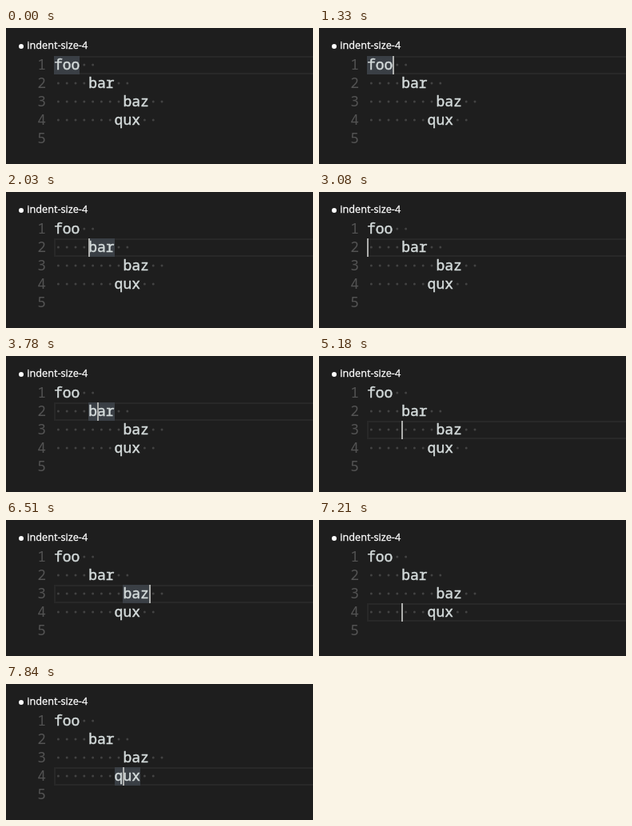
An HTML page that plays this animation: 384 px wide and 170 px high, repeating every 8000 ms.

```html
<!DOCTYPE html>
<html lang="en">
<head>
<meta charset="utf-8">
<title>Editor cursor</title>
<style>
  html, body { margin: 0; width: 100%; height: 100%; overflow: hidden; background: #1e1e1e; }
  svg { display: block; width: 100vw; height: 100vh; }
  .code { font: 18px "Noto Sans Mono", "DejaVu Sans Mono", monospace; fill: #d4dbdb; stroke: #d4dbdb; stroke-width: 0.45px; }
  .num { fill: #535353; stroke: none; text-anchor: end; }
  .tab { font: 12.7px "Open Sans", "Noto Sans", sans-serif; fill: #fff; stroke: #fff; stroke-width: 0.3px; }
  .space { fill: #434343; }
</style>
</head>
<body>
<svg viewBox="0 0 384 170">
  <circle cx="19" cy="23" r="3" fill="#fff"/>
  <text class="tab" x="26.3" y="26">indent-size-4</text>
  <rect id="line" x="61" width="330" height="21" fill="none" stroke="#282828" stroke-width="2"/>
  <rect id="mark" height="23" fill="#3a3f45"/>
  <g id="text"></g>
  <rect id="caret" width="2" height="23" fill="#aeafad"/>
</svg>
<script>
const LOOP = 8000, LEFT = 60, TOP = 35, CELL = 10.8, ROW = 23;
const TAB = 4, TICK = 70, REPEAT = 154, BLINK = 490;

const lines = ['foo', 'bar', 'baz', 'qux', ''].map((word, row) => {
  const indent = [0, 4, 8, 7, 0][row];
  return { word, indent, end: indent + word.length };
});

// start time and the arrow keys pressed from there at the repeat rate
const bursts = [
  [980, '>>>>>>'], [2030, '>'], [2520, '<'], [2870, '><'], [3290, '>'],
  [3640, '>>>>>>'], [4480, '>'], [4620, '>'], [5180, '<'],
  [5530, '<>>'], [6160, '>>>>>>'], [7210, '>>>>>']
];

// Whole tabs of indentation are crossed in one press.
function press({ row, col }, key) {
  const { indent, end } = lines[row];
  const dir = key === '>' ? 1 : -1;
  if (dir > 0 && col === end + 2) return { row: row + 1, col: 0 };
  const onStop = col % TAB === 0 && Math.max(col, col + dir * TAB) <= indent;
  return { row, col: col + dir * (onStop ? TAB : 1) };
}

const states = [{ time: -700, row: 0, col: 0 }];
for (const [start, keys] of bursts) {
  [...keys].forEach((key, i) => {
    const time = start + Math.ceil(i * REPEAT / TICK) * TICK;
    states.push({ time, ...press(states.at(-1), key) });
  });
}

const $ = id => document.getElementById(id);
const colX = col => Math.round(LEFT + col * CELL);
const rowY = row => TOP + row * ROW;

function set(el, attrs) {
  for (const key in attrs) el.setAttribute(key, attrs[key]);
  return el;
}

function add(tag, attrs, text = '') {
  const el = set(document.createElementNS('http://www.w3.org/2000/svg', tag), attrs);
  el.textContent = text;
  $('text').append(el);
}

lines.forEach(({ word, indent, end }, row) => {
  const y = rowY(row) + 17;
  add('text', { class: 'code num', x: 50, y }, row + 1);
  if (!word) return;
  add('text', { class: 'code', x: LEFT + indent * CELL, y }, word);
  for (let col = 0; col < end + 2; col++) {
    if (col >= indent && col < end) continue;
    add('circle', { class: 'space', cx: LEFT + (col + 0.5) * CELL, cy: rowY(row) + 11, r: 1.5 });
  }
});

function draw(now) {
  const { time, row, col } = states.findLast(state => state.time <= now);
  const { indent, end } = lines[row];
  const y = rowY(row);
  const x = colX(indent);
  const hidden = Math.floor((now - time) / BLINK) % 2;
  set($('line'), { y: y + 1 });
  set($('caret'), { x: colX(col), y, opacity: 1 - hidden });
  set($('mark'), { x, y, width: colX(end) - x, opacity: col >= indent && col <= end ? 1 : 0 });
}

function tick() {
  draw(performance.now() % LOOP);
  requestAnimationFrame(tick);
}
tick();
</script>
</body>
</html>
```
